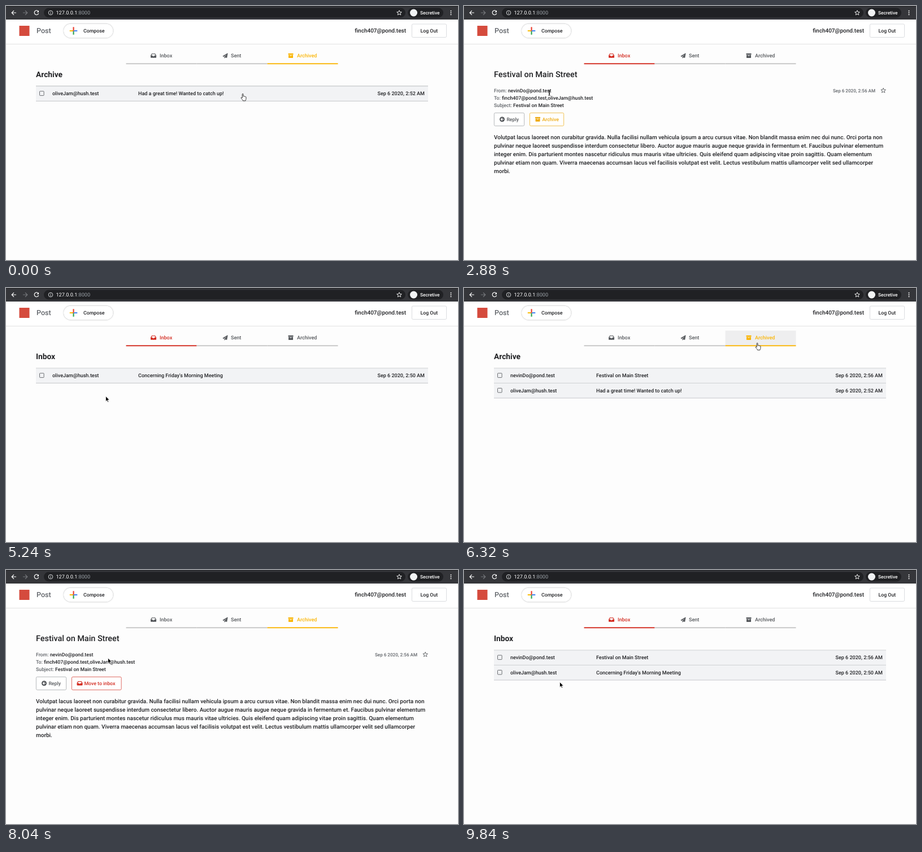
These frames come from a looping animation (800 by 450 pixels, 9.88 s). An HTML page:

```html
<!DOCTYPE html>
<html lang="en">
<head>
<meta charset="utf-8">
<title>Archive and restore a message</title>
<style>
  html, body { margin: 0; width: 100%; height: 100%; overflow: hidden; background: #fdfdfd; }
  svg { display: block; width: 800px; height: 450px; }
  text { font-family: Roboto, sans-serif; font-weight: 500; fill: #202124; white-space: pre; text-rendering: geometricPrecision; }
  .end { text-anchor: end; }
  .bold { font-weight: 700; }
  .soft { fill: #5f6368; }
  .line { fill: none; stroke: currentColor; }
  .tint { fill: currentColor; }
  .pill { filter: drop-shadow(0 .4px .4px rgba(60,64,67,.35)) drop-shadow(0 .6px 1px rgba(60,64,67,.3)); }
  .lift { filter: drop-shadow(0 .8px .7px rgba(60,64,67,.5)); }
</style>
</head>
<body>
<svg viewBox="0 0 800 450">
  <defs>
    <path id="inbox" class="tint" fill-rule="evenodd" d="M-2.6-3.8H2.6Q3-3.8 3.2-3.5L4.9-.6Q5-.4 5-.1V2.9Q5 3.7 4.2 3.7H-4.2Q-5 3.7-5 2.9V-.1Q-5-.4-4.9-.6L-3.2-3.5Q-3-3.8-2.6-3.8ZM-2.2-2.7-3.7-.3H-1.6L-1 .9H1L1.6-.3H3.7L2.2-2.7Z"/>
    <path id="sent" class="tint" d="M4.1-4.4-4.2.4c-.4.2-.3.7 0 .8l1.9.8L2.8-2.5-1.5 2.6V4.1c0 .5.5.6.8.3L.4 3l2.2.9c.3.1.6 0 .6-.3L4.5-3.9c.1-.4-.2-.6-.4-.5z"/>
    <path id="archive" class="tint" fill-rule="evenodd" d="M-4.5-4H4.5V-1.8H-4.5ZM-4-1.3H4V3.4Q4 4 3.4 4H-3.4Q-4 4-4 3.4ZM-1.4-.4V.4H1.4V-.4Z"/>
    <g id="reply"><circle r="4.5" class="tint"/><path d="M.2-2.3-2.1 0 .2 2.3M-2 0H2.6" fill="none" stroke="#fff" stroke-width="1.2"/></g>
    <path id="star" class="line" stroke-width=".9" stroke-linejoin="round"/>
    <path id="hand" transform="translate(.3 0) scale(1.1)" fill="#fff" stroke="#222" stroke-width=".8" stroke-linejoin="round" d="M-1 .2c0-1 1.6-1 1.6 0v3.6c.3-.7 1.5-.6 1.6.2.4-.6 1.5-.4 1.6.4.5-.4 1.3-.1 1.3.7v2.4c0 1.6-1 2-1 3.4H.2c-.2-1.5-2.2-2.8-3-4.4-.5-1 .6-1.5 1.2-.8l.6.7z"/>
    <path id="arrow" stroke="#fff" stroke-width=".7" d="M0 0V9.2L2.1 7.3 3.5 10.5 5 9.9 3.6 6.7H6.5Z"/>
    <path id="beam" fill="none" stroke="#111" stroke-width=".9" d="M-1.7-4.6Q0-4.6 0-3.3V3.3Q0 4.6-1.7 4.6M1.7-4.6Q0-4.6 0-3.3V3.3Q0 4.6 1.7 4.6M-1 1H1"/>
  </defs>

  <!-- browser bar -->
  <rect width="800" height="24" fill="#35363a"/>
  <rect width="800" height="1" fill="#202124"/>
  <rect x="67" y="3.5" width="640" height="17" rx="8.5" fill="#202124"/>
  <rect x="711" y="3.5" width="63" height="17" rx="8.5" fill="#202124"/>
  <g fill="none" stroke="#fff" stroke-width="1.2">
    <path d="M18 12H10.5M14 8.2 10.2 12 14 15.8"/>
    <path d="M30 12H37.5M34 8.2 37.8 12 34 15.8" stroke="#77797d"/>
    <path d="M57 9.4A3.8 3.8 0 1 0 57.6 13"/>
    <g stroke="#e8eaed" stroke-width=".9"><circle cx="79" cy="12" r="3.8"/><path d="M79 11.4V14.2M79 9.6V10.5"/></g>
  </g>
  <path d="M58 7.8V11.3H54.5Z" fill="#fff"/>
  <text x="88.5" y="15.3" font-size="9.1" style="font-weight:400;fill:#fff">127.0.0.1<tspan fill="#9aa0a6">:8000</tspan></text>
  <use href="#star" x="696" y="12.2" color="#fff"/>
  <circle cx="721.5" cy="12" r="6.5" fill="#f1f3f4"/>
  <text x="733" y="15" font-size="8.3" style="fill:#fff">Secretive</text>
  <g fill="#fff"><circle cx="787.5" cy="8.7" r="1"/><circle cx="787.5" cy="12" r="1"/><circle cx="787.5" cy="15.3" r="1"/></g>

  <!-- site header -->
  <rect y="24" width="800" height="43" fill="#fff"/>
  <rect y="67" width="800" height="1" fill="#e2e2e2"/>
  <rect x="23.5" y="35" width="18" height="18" fill="#d54b3d"/>
  <text class="soft" x="54" y="48.2" font-size="12.5">Post</text>
  <rect class="pill" x="102" y="31.5" width="87.5" height="25" rx="12.5" fill="#fff"/>
  <g transform="translate(119.5 44) scale(.56)">
    <path fill="#34a853" d="M-2-2V12H2V2Z"/><path fill="#4285f4" d="M12-2H2L-2 2H12Z"/>
    <path fill="#fbbc05" d="M-12-2V2H-2L2-2Z"/><path fill="#ea4335" d="M2-2V-12H-2V2Z"/>
  </g>
  <text x="137" y="47.1" font-size="8.75">Compose</text>
  <text class="end" x="708" y="47.3" font-size="10">finch407@pond.test</text>
  <rect x="718.4" y="32" width="61.2" height="23.5" rx="2" fill="#fff" stroke="#cbcdd1" stroke-width=".7"/>
  <text x="733.5" y="47.1" font-size="8.75">Log Out</text>

  <g id="page"></g>
  <use id="pointer"/>
</svg>
<script>
const LOOP = 9880;
const RED = '#d32b20', GOLD = '#fab505', GREY = '#55585c';
const page = document.getElementById('page');
const pointer = document.getElementById('pointer');

const spike = i => {
  const a = (i * 36 - 90) * Math.PI / 180, r = i % 2 ? 2 : 4.5;
  return (r * Math.cos(a)).toFixed(2) + ' ' + (r * Math.sin(a)).toFixed(2);
};
document.getElementById('star').setAttribute('d',
  'M' + Array.from({ length: 10 }, (_, i) => spike(i)).join('L') + 'Z');

const ME = 'finch407@pond.test', JAM = 'oliveJam@hush.test', NEV = 'nevinDo@pond.test';
const festival = [NEV, 'Festival on Main Street', 'Sep 6 2020, 2:56 AM'];
const meeting = [JAM, "Concerning Friday's Morning Meeting", 'Sep 6 2020, 2:50 AM'];
const catchUp = [JAM, 'Had a great time! Wanted to catch up!', 'Sep 6 2020, 2:52 AM'];
const body = [
  'Volutpat lacus laoreet non curabitur gravida. Nulla facilisi nullam vehicula ipsum a arcu cursus vitae. Non blandit massa enim nec dui nunc. Orci porta non',
  'pulvinar neque laoreet suspendisse interdum consectetur libero. Auctor augue mauris augue neque gravida in fermentum et. Faucibus pulvinar elementum',
  'integer enim. Dis parturient montes nascetur ridiculus mus mauris vitae ultricies. Quis eleifend quam adipiscing vitae proin sagittis. Quam elementum',
  'pulvinar etiam non quam. Viverra maecenas accumsan lacus vel facilisis volutpat est velit. Lectus vestibulum mattis ullamcorper velit sed ullamcorper',
  'morbi.'
];

// Each view runs until its end time; tab 0 is Inbox, 2 is Archived.
const views = [
  { end: 1240, tab: 2, rows: [catchUp] },
  { end: 2560, tab: 0, rows: [festival, meeting] },
  { end: 4520, tab: 0 },
  { end: 5920, tab: 0, rows: [meeting] },
  { end: 7480, tab: 2, rows: [festival, catchUp] },
  { end: 9360, tab: 2 },
  { end: LOOP, tab: 0, rows: [festival, meeting] }
];

// Pointer stops: time, x, y
const stops = [
  [0, 419, 156], [300, 419, 156], [1000, 280, 88], [1500, 280, 88], [1880, 282, 87],
  [2400, 151, 154], [3100, 151, 154], [3600, 140, 198], [4040, 140, 201],
  [4250, 140, 207], [4600, 140, 207], [4900, 140, 202], [5120, 140, 202],
  [5750, 519, 96], [6320, 519, 98], [6950, 181, 156], [8040, 180.5, 156],
  [8600, 169.5, 198.5], [LOOP, 169.5, 198.5]
];

const text = (x, y, size, str, cls = '', fill = '') =>
  `<text x="${x}" y="${y}" font-size="${size}" class="${cls}"${fill && ` style="fill:${fill}"`}>${str}</text>`;
const rect = (x, y, w, h, attrs) => `<rect x="${x}" y="${y}" width="${w}" height="${h}" ${attrs}/>`;
const icon = (name, x, y, color) => `<use href="#${name}" x="${x}" y="${y}" color="${color}"/>`;

function tabs(active, hover) {
  const items = [['inbox', 'Inbox', 261, 272, RED], ['sent', 'Sent', 388, 398, GREY], ['archive', 'Archived', 504, 515, GOLD]];
  return items.map(([name, label, ix, tx, hue], i) => {
    const x = 212.5 + i * 125, on = i === active, color = on ? hue : GREY;
    return (hover === 'tab' + i ? rect(x, 75.5, 125, 26, 'fill="#eeeeef"') : '') +
      rect(x, 101.3, 125, 1.9, `fill="${on ? hue : '#c6c6c6'}"`) +
      icon(name, ix, 88, color) + text(tx, 91.2, 9, label, '', color);
  }).join('');
}

function row([from, subject, date], i, hover) {
  const y = 142 + i * 26.5, lit = hover === 'row' + i, base = 158.2 + i * 26.3;
  return `<g${lit ? ' class="lift"' : ''}>` +
    rect(53, y, 694, 26.5, 'fill="#f2f3f5"') +
    rect(53, y - .5, 694, 1, 'fill="#cfd1d4"') + rect(53, y + 26, 694, 1, 'fill="#c6c8cb"') + '</g>' +
    rect(59.5, y + 9, 7.6, 7.6, 'rx=".8" fill="none" stroke="#6a6d71"') +
    text(82, base, 9, from) + text(234, base, 9, subject) + text(741, base, 9, date, 'end');
}

function button(x, w, name, label, color, edge, fill) {
  return rect(x + .4, 189.4, w - .8, 23, `rx="2" fill="${fill}" stroke="${edge}" stroke-width=".7"`) +
    icon(name, x + 14.5, 200.7, color) + text(x + 22.4, 203.9, 8.75, label, '', color);
}

function message(tab, hover) {
  const lines = [['From', NEV], ['To', ME + ',' + JAM], ['Subject', festival[1]]];
  const lit = hover === 'move';
  return text(53, 126.2, 14.4, festival[1]) +
    lines.map(([k, v], i) => text(53, 153.1 + i * 13.1, 8.75, `<tspan class="soft">${k}: </tspan>${v}`)).join('') +
    text(728, 152.5, 8.1, festival[2], 'end soft') + icon('star', 742.2, 149.8, GREY) +
    button(53, 54, 'reply', 'Reply', GREY, '#999ca0', '#fff') +
    (tab ? button(116, 88.5, 'inbox', 'Move to inbox', RED, RED, lit ? '#fce8e6' : '#fff')
         : button(116, 61, 'archive', 'Archive', '#eeaa10', '#eba90f', lit ? '#feefc3' : '#fff')) +
    body.map((l, i) => text(53, 235.7 + i * 15, 10, l)).join('');
}

function draw(view, hover) {
  return tabs(view.tab, hover) + (view.rows
    ? text(53, 126.2, 13.75, view.tab ? 'Archive' : 'Inbox', 'bold') + view.rows.map((r, i) => row(r, i, hover)).join('')
    : message(view.tab, hover));
}

function pointerAt(t) {
  const i = stops.findIndex((s, k) => k && t <= s[0]);
  const [t0, x0, y0] = stops[i - 1], [t1, x1, y1] = stops[i];
  const u = (t - t0) / (t1 - t0), e = u * u * (3 - 2 * u);
  return [x0 + (x1 - x0) * e, y0 + (y1 - y0) * e];
}

// Name of the thing under the pointer, or an empty string.
function hit(view, x, y) {
  const inside = (l, t, r, b) => x >= l && x < r && y >= t && y < b;
  if (inside(212.5, 75.5, 587.5, 103)) return 'tab' + Math.floor((x - 212.5) / 125);
  if (view.rows) {
    const i = Math.floor((y - 142) / 26.5);
    return x > 53 && x < 747 && view.rows[i] ? 'row' + i : '';
  }
  if (inside(116, 189, view.tab ? 204 : 177, 213)) return 'move';
  if (inside(53, 189, 107, 213)) return 'reply';
  return inside(53, 144, 154, 156) || inside(53, 156.5, 229, 169.5) || inside(53, 169.5, 177, 182) ? 'words' : '';
}

const start = performance.now();
let shown = '';
function frame() {
  const t = (performance.now() - start) % LOOP;
  const n = views.findIndex(v => t < v.end), view = views[n];
  const [x, y] = pointerAt(t), hover = hit(view, x, y);
  if (shown !== n + hover) {
    shown = n + hover;
    page.innerHTML = draw(view, hover);
    pointer.setAttribute('href', hover === 'words' ? '#beam' : hover ? '#hand' : '#arrow');
  }
  pointer.setAttribute('transform', `translate(${x.toFixed(2)} ${y.toFixed(2)})`);
  requestAnimationFrame(frame);
}
frame();
</script>
</body>
</html>
```
